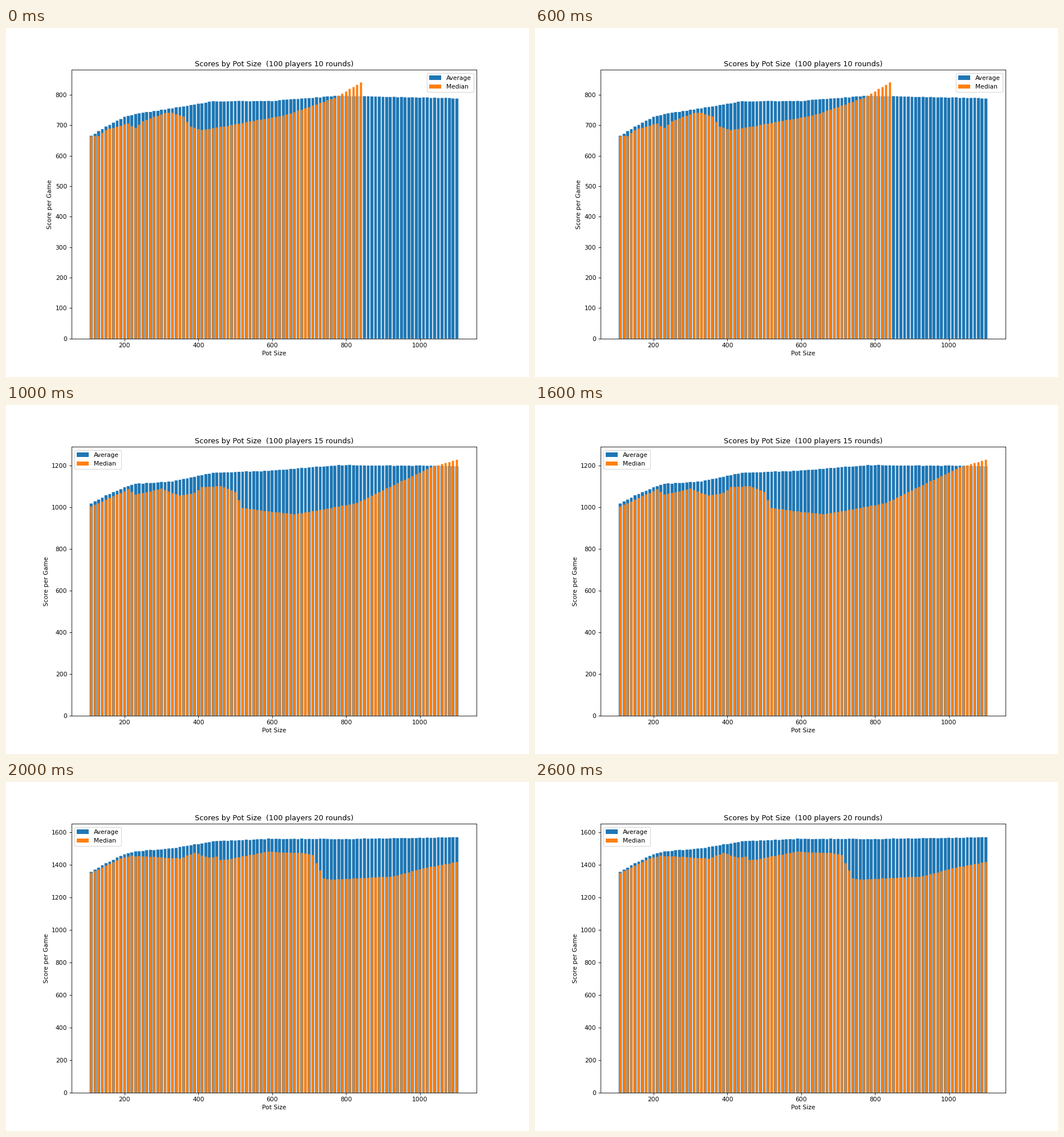
Animation, 917 px wide and 611 px high, one loop 3000 ms. Source, as a matplotlib script:

```python
import numpy as np
import matplotlib.pyplot as plt
from matplotlib.animation import FuncAnimation

WIDTH, HEIGHT = 917, 611
DPI = WIDTH / 12
POTS = np.arange(110, 1101, 10)
X_MIN, X_MAX = 56.1, 1153.9
COLUMNS = 930  # bar edges sit on this many columns across the axes

# Averages climb and level off at shared pot sizes.
AVG_POTS = [110, 150, 200, 230, 330, 440, 600, 780, 1100]

# Medians as (pot size, score) turning points.
MEDIAN_10 = [
    (110, 664), (130, 665), (150, 685), (210, 706), (230, 691), (250, 714),
    (310, 740), (330, 740), (360, 729), (380, 695), (410, 684), (470, 696),
    (640, 735), (770, 790), (840, 840),
]
MEDIAN_15 = [
    (110, 1003), (210, 1085), (230, 1060), (300, 1088), (350, 1055),
    (390, 1068), (410, 1096), (460, 1101), (500, 1072), (520, 997),
    (570, 984), (660, 966), (720, 983), (830, 1020), (950, 1124),
    (1030, 1190), (1100, 1228),
]
MEDIAN_20 = [
    (110, 1351), (190, 1442), (220, 1457), (350, 1440), (390, 1475),
    (430, 1446), (450, 1450), (460, 1430), (480, 1435), (590, 1482),
    (680, 1475), (710, 1460), (740, 1318), (760, 1310), (930, 1330),
    (1010, 1380), (1100, 1418),
]

# rounds, average scores, median points, highest score, legend corner
CHARTS = [
    (10, [665, 696, 727, 737, 756, 779, 780, 797, 789],
     MEDIAN_10, 840, "upper right"),
    (15, [1017, 1057, 1094, 1112, 1123, 1166, 1175, 1202, 1197],
     MEDIAN_15, 1228, "upper left"),
    (20, [1359, 1412, 1466, 1485, 1503, 1546, 1562, 1560, 1570],
     MEDIAN_20, 1574.6, "upper left"),
]

fig, ax = plt.subplots(figsize=(12, HEIGHT / DPI), dpi=DPI)


def snap(x):
    """Move x to the nearest column edge."""
    step = (X_MAX - X_MIN) / COLUMNS
    return X_MIN + np.floor((x - X_MIN) / step + 0.5) * step


def draw_bars(x, y, width, rng, color, label):
    pots = POTS[POTS <= x[-1]]
    wobble = 1 + 0.0015 * rng.uniform(-1, 1, len(pots))
    left, right = snap(pots - width / 2), snap(pots + width / 2)
    ax.bar(left, np.interp(pots, x, y) * wobble, right - left,
           align="edge", color=color, label=label, snap=False)


def draw(i):
    rounds, average, median, peak, corner = CHARTS[i]
    rng = np.random.default_rng(rounds)
    ax.clear()
    draw_bars(AVG_POTS, average, 8, rng, "tab:blue", "Average")
    draw_bars(*zip(*median), 6, rng, "tab:orange", "Median")
    ax.set_xlim(X_MIN, X_MAX)
    ax.set_ylim(0, peak * 1.05)
    ax.set_title(f"Scores by Pot Size  (100 players {rounds} rounds)")
    ax.set_xlabel("Pot Size")
    ax.set_ylabel("Score per Game")
    ax.legend(loc=corner)


anim = FuncAnimation(fig, draw, frames=len(CHARTS), interval=1000, repeat=True)
plt.show()
```
